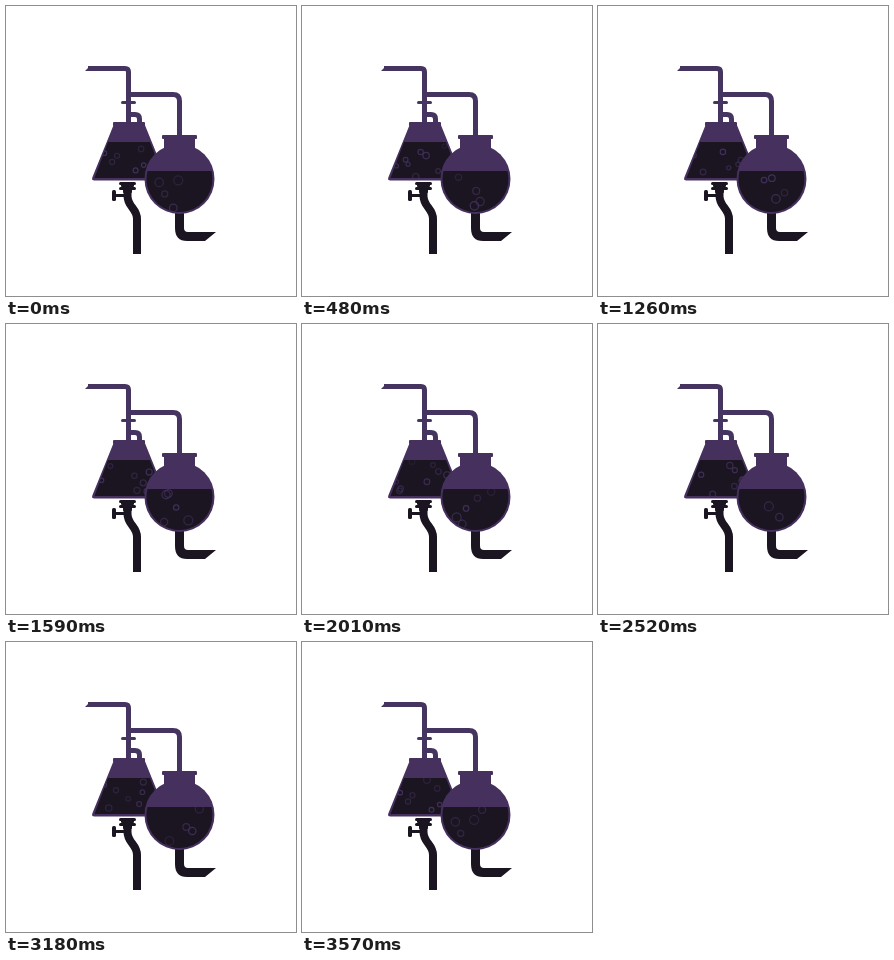
Recreate the animation shown at these times as an HTML page with a canvas. Size 290 by 290 pixels, loop 3.6 s.

```html
<!DOCTYPE html>
<html lang="en">
<head>
<meta charset="utf-8">
<title>Bubbling flasks</title>
<style>
  html, body { margin: 0; width: 100%; height: 100%; overflow: hidden; background: #fff; }
  canvas { display: block; width: 290px; height: 290px; }
</style>
</head>
<body>
<canvas id="stage"></canvas>
<script>
const LOOP = 3600, STEP = 30, RISE = 0.115;
const PIPE = '#44345f', GLASS = '#46315e', DARK = '#1b1521', RING = '#41305a';
const BALL = { x: 173.5, y: 173, r: 35 }, BALL_LEVEL = 165;
const canvas = document.getElementById('stage');
const ctx = canvas.getContext('2d');
const ratio = window.devicePixelRatio || 1;
canvas.width = canvas.height = 290 * ratio;

const mainPipe = new Path2D('M82 62.5H119Q122.5 62.5 122.5 66V118');
const sidePipe = new Path2D('M123 88.5H167Q173.5 88.5 173.5 95V131 M123 108.5H129Q133.5 108.5 133.5 113V118');
const pipeTip = new Path2D('M79 65L84 60V65Z');
const cone = new Path2D('M108 118H138.5L160 171Q161 174.5 158 174.5H88.5Q85 174.5 86.5 171Z');
const coneLiquid = new Path2D('M102 136H144L158 172H88.5Z');
const drain = new Path2D('M121.5 184V190C121.5 201 131 202 131 213V248');
const spout = new Path2D('M169 205H178V222Q178 226 182 226H210L199 235H181Q169 235 169 222Z');
const ball = new Path2D();
ball.arc(BALL.x, BALL.y, BALL.r, 0, Math.PI * 2);
const ballLiquid = new Path2D();
const dip = Math.asin((BALL_LEVEL - BALL.y) / (BALL.r - 2));
ballLiquid.arc(BALL.x, BALL.y, BALL.r - 2, dip, Math.PI - dip);
ballLiquid.closePath();

let seed = 17;
function random(low, high) {
  seed = (seed * 16807) % 2147483647;
  return low + (high - low) * seed / 2147483647;
}

// Births are spread evenly over the loop, with some jitter.
function makeBubbles(count, left, right, small, large, floor) {
  return Array.from({ length: count }, (_, i) => {
    const x = random(left, right);
    return {
      x,
      y: floor(x),
      birth: (i + random(0, 1)) * LOOP / count,
      radius: random(small, large),
      strength: random(0.4, 1),
      sway: random(-1.5, 1.5)
    };
  });
}

const coneBubbles = makeBubbles(95, 94, 146, 2, 3.4, () => 171);
const ballBubbles = makeBubbles(44, 152, 196, 2.6, 4.6,
  x => BALL.y + Math.sqrt((BALL.r - 3) ** 2 - (x - BALL.x) ** 2));

function fill(path, color) {
  ctx.fillStyle = color;
  ctx.fill(path);
}

function stroke(path, color, width) {
  ctx.strokeStyle = color;
  ctx.lineWidth = width;
  ctx.stroke(path);
}

function bar(x, y, w, h, color, r = 1) {
  ctx.fillStyle = color;
  ctx.beginPath();
  ctx.roundRect(x, y, w, h, r);
  ctx.fill();
}

function drawBubbles(bubbles, liquid, level, t) {
  ctx.save();
  ctx.clip(liquid);
  ctx.strokeStyle = RING;
  ctx.lineWidth = 1.2;
  for (const b of bubbles) {
    const age = (t - b.birth + LOOP) % LOOP;
    const y = b.y - RISE * age;
    if (y < level) continue;
    ctx.globalAlpha = b.strength * Math.min(1, 0.4 + (y - level) / 10);
    ctx.beginPath();
    ctx.arc(b.x + b.sway * Math.sin(age / 60), y, b.radius, 0, Math.PI * 2);
    ctx.stroke();
  }
  ctx.restore();
}

function drawPipes() {
  stroke(mainPipe, PIPE, 5);
  stroke(sidePipe, PIPE, 5);
  fill(pipeTip, PIPE);
  bar(115, 95, 15, 3, PIPE, 1.5);
}

function drawDrain() {
  stroke(drain, DARK, 8);
  bar(113, 176, 17, 3, DARK, 1.5);
  bar(115, 178, 13, 3, DARK);
  bar(113, 181, 17, 3, DARK, 1.5);
  bar(117, 183, 9, 4, DARK);
  bar(106, 184, 4, 11, DARK, 1.5);
  bar(109, 188, 10, 3, DARK);
  fill(spout, DARK);
}

function draw(t) {
  ctx.setTransform(ratio, 0, 0, ratio, 0, 0);
  ctx.fillStyle = '#fff';
  ctx.fillRect(0, 0, 290, 290);

  drawPipes();
  drawDrain();

  fill(cone, GLASS);
  bar(107, 116, 32, 4, GLASS);
  fill(coneLiquid, DARK);
  drawBubbles(coneBubbles, coneLiquid, 137, t);

  fill(ball, GLASS);
  bar(156, 129, 35, 4, GLASS);
  bar(158, 131, 31, 13, GLASS);
  fill(ballLiquid, DARK);
  drawBubbles(ballBubbles, ballLiquid, BALL_LEVEL, t);
}

function tick() {
  const t = performance.now() % LOOP;
  draw(t - t % STEP);
  requestAnimationFrame(tick);
}
tick();
</script>
</body>
</html>
```
